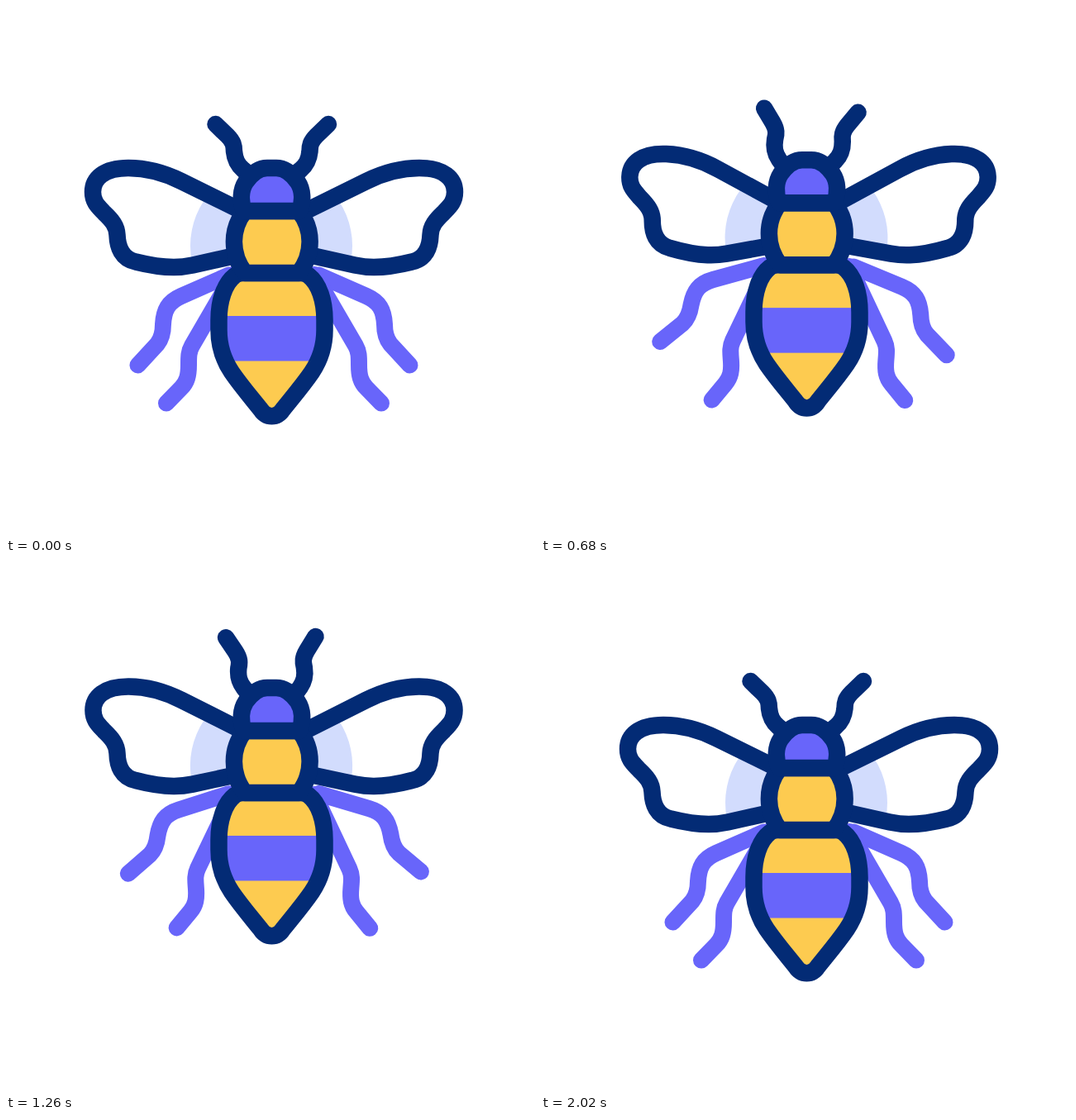
An HTML page for the animation above (2400 ms loop, 640 px wide and 640 px high).

```html
<!DOCTYPE html>
<html lang="en">
<head>
<meta charset="utf-8">
<title>Bee</title>
<style>
  html, body { margin: 0; width: 100%; height: 100%; overflow: hidden; background: #fff; }
  svg { display: block; width: 100vw; height: 100vh; }
  .line { fill: none; stroke: #032b75; stroke-width: 20.5; stroke-linecap: round; stroke-linejoin: round; }
  .leg { stroke: #6865fa; stroke-width: 20; }
  .glow { fill: #d2dcfd; }
  .yellow { fill: #fdcb50; }
  .purple { fill: #6865fa; }
</style>
</head>
<body>
<svg viewBox="0 0 640 640">
  <defs>
    <path id="wing" d="M290 250.4 L212 212 C189 200.5 170 196 148 196 C118 196 105 209 105 225
      C105 237 111 242 119 250.5 C128 259 134 266 134.5 277 C135 292 140 306 157 309.5
      C175 314 190 316 203 316 C212 316 219 315 226 313.5 L300 297 Z"/>
    <path id="upperLeg" class="line leg" d="M270 325.5 L212 351 C196 358 191 368 190 385
      C190 398 187 404 183 409 L159.5 434.5"/>
    <path id="lowerLeg" class="line leg" d="M275 325 L225 411 C221 418 221 424 221 434
      C221 447 219 455 212 462 L194 480.5"/>
    <path id="antenna" class="line" d="M253.5 143 L268 157 C275 164 276 169 276 176
      C277 186 280 192 287 198 L298 207"/>
    <path id="abdomen" d="M287 323 H356 Q362 323 366 326 C379 336 385.5 357 385.5 380 V392
      C385.5 412 380 428 370 443 C359 459 347 473 335 488 C328 499 315 499 308 488
      C296 473 284 459 273 443 C263 428 257.5 412 257.5 392 V380
      C257.5 357 264 336 277 326 Q281 323 287 323 Z"/>
    <clipPath id="inWing"><use href="#wing"/></clipPath>
    <clipPath id="inAbdomen"><use href="#abdomen"/></clipPath>
  </defs>
  <g id="bee">
    <g id="legUL"><use href="#upperLeg"/></g>
    <g id="legLL"><use href="#lowerLeg"/></g>
    <g transform="translate(648) scale(-1 1)">
      <g id="legUR"><use href="#upperLeg"/></g>
      <g id="legLR"><use href="#lowerLeg"/></g>
    </g>

    <g id="wingL">
      <use href="#wing" fill="#fff"/>
      <circle class="glow" cx="321" cy="290" r="98" clip-path="url(#inWing)"/>
      <use href="#wing" class="line"/>
    </g>
    <g transform="translate(648) scale(-1 1)">
      <g id="wingR">
        <use href="#wing" fill="#fff"/>
        <circle class="glow" cx="327" cy="290" r="98" clip-path="url(#inWing)"/>
        <use href="#wing" class="line"/>
      </g>
    </g>

    <g id="antL"><use href="#antenna"/></g>
    <g transform="translate(643.5) scale(-1 1)">
      <g id="antR"><use href="#antenna"/></g>
    </g>

    <use href="#abdomen" class="yellow"/>
    <rect class="purple" x="250" y="375" width="145" height="54.5" clip-path="url(#inAbdomen)"/>
    <use href="#abdomen" class="line"/>
    <path class="line" style="fill:#fdcb50" d="M289 248 C271.5 270 271.5 300 289 323 H354.5 C372 300 372 270 354.5 248 Z"/>
    <path class="line" style="fill:#6865fa" d="M288 248 C283 236 284 222 290 213 C297 203 305 196 316 196
      H327 C338 196 346 203 353 213 C359 222 360 236 355 248 Z"/>
  </g>
</svg>
<script>
  const LOOP = 2400, END = 2020;
  const byId = id => document.getElementById(id);
  const ease = p => (1 - Math.cos(Math.PI * p)) / 2;

  const alternate = (count, high, low) =>
    Array.from({ length: count }, (_, i) => i % 2 ? low : high);

  // Leaves rest at `start`, passes the stops `step` ms apart, then settles back to rest at END.
  function swing(first, step, stops, start = 0) {
    const last = stops.length - 1, lastTime = first + last * step;
    return t => {
      if (t <= start || t >= END) return 0;
      if (t < first) return stops[0] * ease((t - start) / (first - start));
      if (t >= lastTime) return stops[last] * (1 - ease((t - lastTime) / (END - lastTime)));
      const at = (t - first) / step, i = Math.floor(at);
      return stops[i] + (stops[i + 1] - stops[i]) * ease(at - i);
    };
  }

  const bob = swing(455, 388, [-40, 8, -46, 18.5]);
  const flap = swing(202, 193, alternate(8, 20, -17.5));

  // Positive angles lift a limb or lean an antenna inwards.
  const joints = [
    { id: 'wingL', pivot: '324 279', angle: flap },
    { id: 'wingR', pivot: '324 279', angle: flap },
    { id: 'legUL', pivot: '280 320', angle: swing(270, 322, alternate(5, 19, 6)) },
    { id: 'legUR', pivot: '280 320', angle: swing(440, 280, [24, 0, 24, 7, 23], 140) },
    { id: 'legLL', pivot: '275 325', angle: swing(410, 290, alternate(5, 17, -4.8)) },
    { id: 'legLR', pivot: '275 325', angle: swing(400, 290, alternate(5, 15, -5)) },
    { id: 'antL', pivot: '297 200', angle: swing(610, 390, alternate(3, 17, -4)) },
    { id: 'antR', pivot: '297 200', angle: swing(460, 420, alternate(4, 14.7, -1)) }
  ];

  function draw(t) {
    byId('bee').setAttribute('transform', `translate(0 ${bob(t)})`);
    for (const { id, pivot, angle } of joints) {
      byId(id).setAttribute('transform', `rotate(${angle(t)} ${pivot})`);
    }
  }

  const begin = performance.now();
  function tick() {
    draw((performance.now() - begin) % LOOP);
    requestAnimationFrame(tick);
  }
  draw(0);
  requestAnimationFrame(tick);
</script>
</body>
</html>
```
